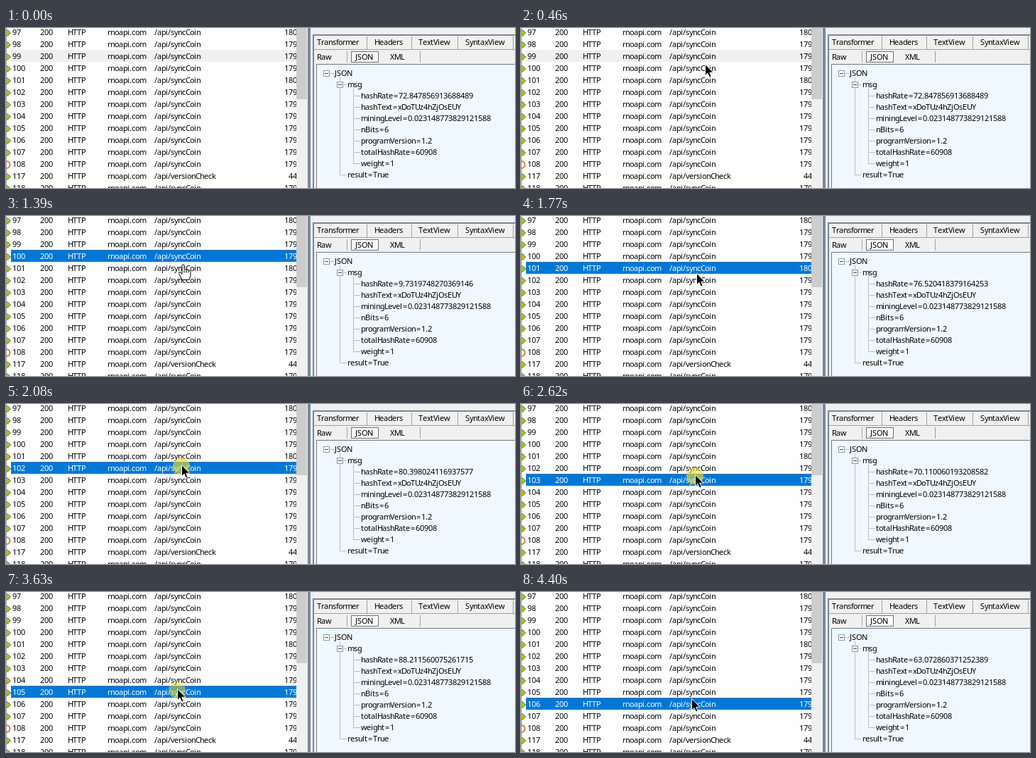
Write an HTML page with a canvas that moves like this. It is 717 by 227 pixels and loops after 5.01 s.

```html
<!DOCTYPE html>
<html lang="en">
<head>
<meta charset="utf-8">
<title>Session inspector</title>
<style>
html, body { margin: 0; width: 717px; height: 227px; overflow: hidden; }
canvas { display: block; }
</style>
</head>
<body>
<canvas id="stage" width="717" height="227"></canvas>
<script>
const g = document.getElementById('stage').getContext('2d', { alpha: false });
const LOOP = 5010, TICKS = 65, FIRST_ID = 99;
const LINE = '#a0a0a0', FRAME = '#76879a';

// Each click picks the next session: [press tick, release tick, hash rate]
const clicks = [
  [0, 0, '72.847856913688489'],
  [9, 11, '9.7319748270369146'],
  [20, 21, '76.520418379164253'],
  [26, 28, '80.398024116937577'],
  [33, 36, '70.110060193208582'],
  [41, 43, '84.035172946380127'],
  [45, 48, '88.211560075261715'],
  [56, 57, '63.072860371252389']
];

// Downward pointer moves between rests: [start tick, end tick, y reached]
const glides = [
  [11, 14, 68], [19, 20, 79], [22, 26, 86], [28, 33, 100],
  [35, 41, 124], [42, 45, 137], [48, 54, 151]
];

const progress = (tick, from, to) => Math.min(1, Math.max(0, (tick - from) / (to - from)));

function rect(x, y, w, h, color) {
  g.fillStyle = color;
  g.fillRect(x, y, w, h);
}

// Whole-pixel glyph advances, as in classic desktop text
function text(str, x, y, color = '#000') {
  g.fillStyle = color;
  for (const ch of str) {
    const wide = ch === '=';
    g.fillText(ch, x + wide, y);
    x += wide ? 8 : Math.round(g.measureText(ch).width * 0.92);
  }
}

function shape(points, fill, stroke) {
  g.beginPath();
  points.forEach(([x, y]) => g.lineTo(x, y));
  g.closePath();
  g.fillStyle = fill;
  g.strokeStyle = stroke;
  g.lineWidth = 1;
  g.fill();
  g.stroke();
}

function circle(x, y, r) {
  g.beginPath();
  g.arc(x, y, r, 0, 2 * Math.PI);
}

function dotsAcross(x, y, length) {
  for (let i = 0; i < length; i += 2) rect(x + i, y, 1, 1, '#808080');
}

function dotsDown(x, y, length) {
  for (let i = 0; i < length; i += 2) rect(x, y + i, 1, 1, '#808080');
}

function toggle(x, y) {
  rect(x - 4, y - 4, 9, 9, '#8496a8');
  rect(x - 3, y - 3, 7, 7, '#fff');
  rect(x - 2, y, 5, 1, '#34465c');
}

function drawIcon(id, y) {
  if (id === 108) {
    circle(0.5, y, 5);
    g.strokeStyle = '#d9782d';
    g.lineWidth = 2;
    g.stroke();
  } else {
    shape([[2, y - 4.5], [6.5, y], [2, y + 4.5], [-2.5, y]], '#a5c520', '#5c6b1c');
  }
}

function drawList(selected) {
  rect(0, 0, 409, 227, '#fff');
  for (let i = 0; i < 14; i++) {
    const id = i < 12 ? 97 + i : 105 + i;
    const top = 17 * i - 3, base = top + 13;
    const active = id === selected && id !== FIRST_ID;
    const color = active ? '#fff' : '#000';
    const check = id === 117;
    const size = check ? '44' : id % 4 === 1 && id < 105 ? '180' : '179';
    if (id === selected) rect(7, top, 402, 17, active ? '#0078d7' : '#f0f0f0');
    drawIcon(id, top + 10);
    text(String(id), 9, base, color);
    text('200', 48, base, color);
    text('HTTP', 87, base, color);
    text('rnoapi.com', 143, base, color);
    text(check ? '/api/versionCheck' : '/api/syncCoin', 209, base, color);
    text(size, 410 - 6 * size.length, base, color);
  }
  rect(0, 0, 1, 227, LINE);
  rect(409, 0, 16, 227, '#f0f0f0');
  rect(409, 0, 15, 101, '#cdcdcd');
}

function drawTabs() {
  rect(425, 0, 292, 227, '#f0f0f0');
  rect(425, 0, 4, 227, FRAME);
  rect(432, 9, 285, 2, FRAME);
  rect(432, 9, 2, 218, FRAME);
  rect(434, 30, 283, 1, LINE);
  [508, 571, 636, 714].forEach(x => rect(x, 12, 1, 18, LINE));
  text('Transformer', 438, 24);
  text('Headers', 519, 24);
  text('TextView', 581, 24);
  text('SyntaxView', 647, 24);

  [480, 583].forEach(x => rect(x, 33, 1, 16, LINE));
  rect(486, 33, 39, 16, '#707070');
  rect(487, 34, 37, 14, '#fafafa');
  text('Raw', 438, 45);
  text('JSON', 492, 45);
  text('XML', 541, 45);
}

function drawTree(rate) {
  rect(437, 51, 280, 176, '#6c7a89');
  rect(438, 52, 279, 175, '#f0f8ff');
  dotsAcross(457, 64, 5);
  dotsDown(470, 70, 138);
  dotsAcross(476, 80, 4);
  dotsAcross(470, 208, 10);
  dotsDown(489, 86, 106);
  toggle(451, 64);
  toggle(470, 80);
  text('JSON', 463, 68);
  text('msg', 481, 84);
  [
    'hashRate=' + rate, 'hashText=xDoTUz4hZjOsEUY', 'miningLevel=0.023148773829121588',
    'nBits=6', 'programVersion=1.2', 'totalHashRate=60908', 'weight=1'
  ].forEach((line, i) => {
    dotsAcross(489, 96 + 16 * i, 9);
    text(line, 500, 100 + 16 * i);
  });
  text('result=True', 481, 212);
}

// Swoops in from the right, then drifts left while stepping down the rows
function pointerAt(tick) {
  const away = (1 - progress(tick, 1, 7)) ** 2;
  let y = 49;
  for (const [from, to, end] of glides) y += (end - y) * progress(tick, from, to);
  const x = 254 - 14 * ((y - 49) / 102) ** 0.65;
  return [Math.round(x + 188 * away), Math.round(y + 79 * away)];
}

function drawArrow() {
  shape([[0, 0], [0, 16], [3.5, 12.8], [6, 18.5], [8.6, 17.4], [6.2, 11.8], [11.2, 11.5]], '#000', '#fff');
}

function drawHand() {
  shape([
    [-1.5, 1], [0, 0], [1.5, 1], [1.5, 7], [7.5, 8], [10.5, 10], [10.5, 16],
    [8.5, 22], [-1.5, 22], [-6, 13], [-5.5, 11], [-3.5, 11.5], [-1.5, 14]
  ], '#fff', '#000');
  [1, 4, 7].forEach(x => rect(x, 8, 1, 4, '#000'));
}

function drawPointer(tick, [press, release]) {
  const [x, y] = pointerAt(tick);
  if (tick < release) {
    circle(x, y + 2, 12);
    g.fillStyle = `rgba(232, 220, 50, ${0.8 - 0.15 * (tick - press)})`;
    g.fill();
  }
  g.save();
  g.translate(x + 0.5, y + 0.5);
  if (tick === 18 || tick === 19) drawHand();
  else drawArrow();
  g.restore();
}

function draw(time) {
  const tick = Math.min(TICKS - 1, Math.floor((time + 8) * TICKS / LOOP));
  const index = clicks.filter(([press]) => press <= tick).length - 1;
  const click = clicks[index];
  g.font = '11px "Noto Sans", "Open Sans", sans-serif';
  drawList(FIRST_ID + index);
  drawTabs();
  drawTree(click[2]);
  if (tick > 0) drawPointer(tick, click);
}

const start = performance.now();
function loop() {
  draw((performance.now() - start) % LOOP);
  requestAnimationFrame(loop);
}
loop();
</script>
</body>
</html>
```
